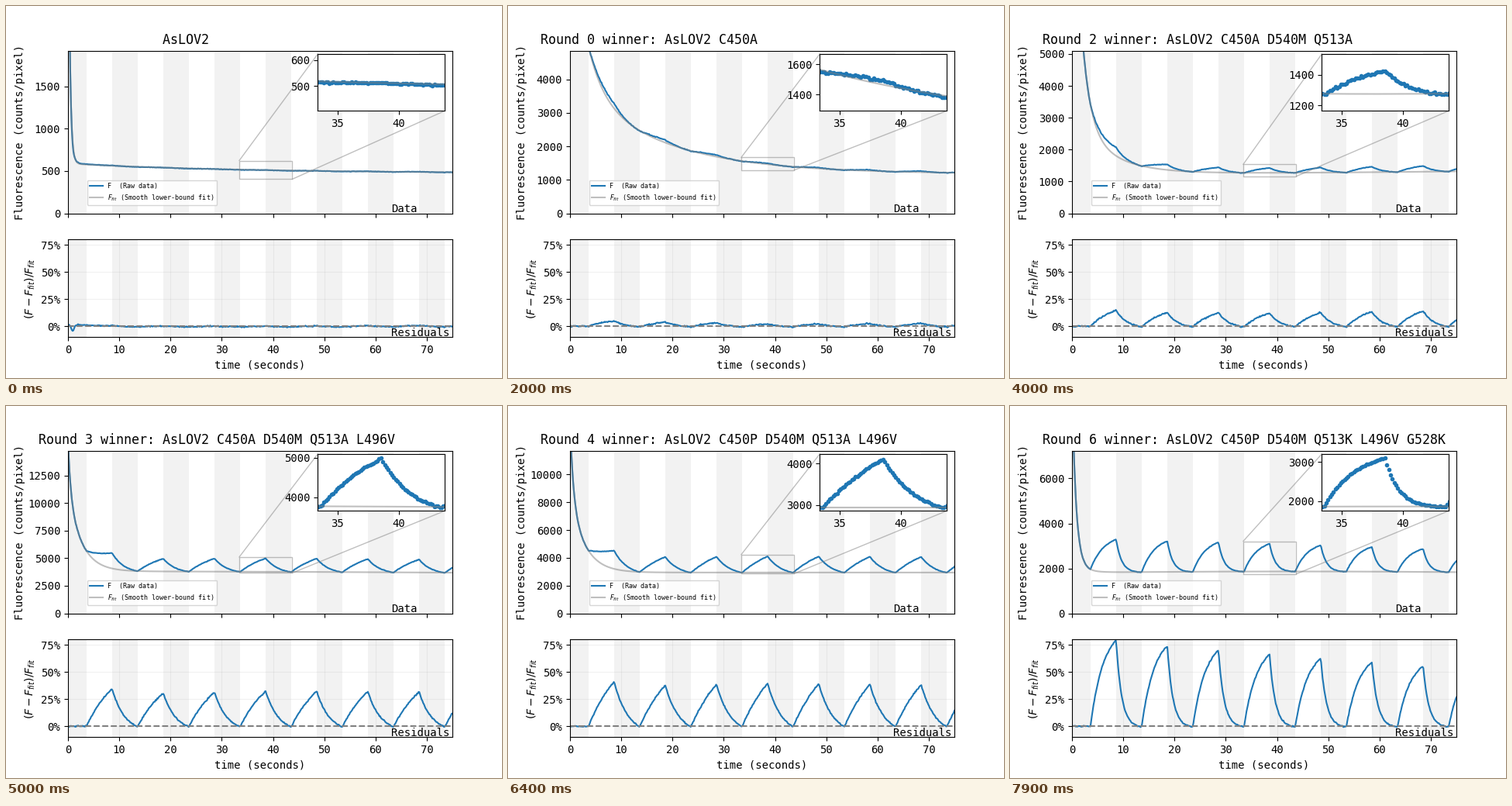
Recreate the animation shown at these times as a matplotlib script. Size 640x480 px, loop 8 s.

```python
import numpy as np
import matplotlib.pyplot as plt
from matplotlib.animation import FuncAnimation
from matplotlib.ticker import PercentFormatter

plt.rcParams.update({"font.family": "DejaVu Sans Mono", "font.size": 10})

BLUE = "tab:blue"
T = np.arange(0, 75.1, 0.15)
PERIOD, LIT, DARK_START = 9.985, 5.0, 3.6
WINDOW = (33.4, 43.75)
STARTS = np.array([0, 2000, 3000, 4000, 5000, 6000, 7000, 7900])
STEP, LOOP = 100, 8000

# base: quadratic baseline, decay: (amplitude, time constant) pairs,
# peaks: residual peak in % at cycles 0, 1, 3 and 7, tau: rise and fall
ROUNDS = [
    dict(name="AsLOV2", base=(472, 0, 0), decay=((4240, 0.33), (115, 36)),
         peaks=(0, 0, 0, 0.8), tau=(4, 4), top=1922, zoom=(404, 623)),
    dict(name="AsLOV2 C450A", base=(1180, 0, 0),
         decay=((5236, 3), (2742, 17)),
         peaks=(4.8, 3.8, 2, 2.8), tau=(4, 3), top=4853, zoom=(1291, 1668)),
    dict(name="AsLOV2 C450A D540M", base=(4360, 0, 0),
         decay=((5100, 2), (4516, 11.5)),
         peaks=(2.2, 1.8, 1.4, 1), tau=(4, 3), top=17422, zoom=(4345, 4735)),
    dict(name="AsLOV2 C450A D540M Q513A", base=(1251, 0, 0.012),
         decay=((10171, 1.6), (1904, 6.5)),
         peaks=(14.5, 12.5, 12, 14.5), tau=(4.2, 2.2), top=5107,
         zoom=(1163, 1537)),
    dict(name="AsLOV2 C450A D540M Q513A L496V", base=(3800, 0, -0.02),
         decay=((4500, 0.5), (7400, 2.6)),
         peaks=(34.5, 30.5, 32.3, 31.3), tau=(6, 2.5), top=14739,
         zoom=(3662, 5098)),
    dict(name="AsLOV2 C450P D540M Q513A L496V", base=(2945, 0, 0),
         decay=((5400, 0.6), (5700, 2.8)),
         peaks=(41.2, 37.8, 39.5, 37.8), tau=(7, 2.8), top=11725,
         zoom=(2864, 4233)),
    dict(name="AsLOV2 C450P D540M Q513K L496V", base=(2200, 1.5, -0.02),
         decay=((7500, 0.75), (1200, 2)),
         peaks=(60, 57, 53, 46), tau=(3.5, 1.6), top=8760,
         zoom=(2110, 3500)),
    dict(name="AsLOV2 C450P D540M Q513K L496V G528K",
         base=(1808, 2.6, -0.03), decay=((8000, 0.75), (500, 2)),
         peaks=(79, 74, 66, 52), tau=(2.5, 1.1), top=7237,
         zoom=(1752, 3208)),
]


def residual(index, spec):
    """Sawtooth of saturating rises and exponential falls, plus noise."""
    cycle = np.floor((T - DARK_START) / PERIOD)
    u = T - DARK_START - cycle * PERIOD
    peak = np.interp(cycle, [0, 1, 3, 7], spec["peaks"]) / 100
    rise, fall = spec["tau"]
    low = np.where(cycle > 0, -0.006, 0)
    up = (1 - np.exp(-u / rise)) / (1 - np.exp(-LIT / rise))
    end = np.exp(-LIT / fall)
    down = (np.exp(-(u - LIT) / fall) - end) / (1 - end)
    r = np.where(u < LIT, low + (peak - low) * up,
                 -0.006 + (peak + 0.006) * down)
    r[T < DARK_START] = 0
    if index == 0:
        r += 0.022 * np.exp(-T / 5) - 0.06 * np.exp(-((T - 0.9) / 0.45) ** 2)
    return r + np.random.default_rng(index + 5).normal(0, 0.0028, T.size)


def curves(index, spec):
    c, m, k = spec["base"]
    fit = c + m * T + k * T**2
    for amp, tau in spec["decay"]:
        fit = fit + amp * np.exp(-T / tau)
    r = residual(index, spec)
    return fit * (1 + r), fit, r


DATA = [curves(i, spec) for i, spec in enumerate(ROUNDS)]

fig, (ax, res) = plt.subplots(
    2, 1, sharex=True, figsize=(6.4, 4.8), dpi=100,
    gridspec_kw=dict(height_ratios=[5, 3], hspace=0.2))

for panel, label in ((ax, "Data"), (res, "Residuals")):
    for k in range(8):
        start = DARK_START + LIT + (k - 1) * PERIOD
        panel.axvspan(start, start + LIT, color="0.95", lw=0)
    panel.text(0.84, 0.01, label, transform=panel.transAxes)

title = fig.text(42 / 640, 1 - 49.3 / 480, "", fontsize=12)

raw, = ax.plot([], [], color=BLUE, lw=1.5, label="F  (Raw data)")
fit_line, = ax.plot([], [], color="gray", alpha=0.5, lw=1.5,
                    label="$F_{fit}$ (Smooth lower-bound fit)")
ax.set_xlim(0, 75)
ax.set_ylabel("Fluorescence (counts/pixel)")
ax.yaxis.set_label_coords(-0.11, 0.5)
ax.legend(loc=(0.05, 0.05), fontsize=6)

zoom = ax.inset_axes([0.65, 0.63, 0.33, 0.35])
zoom_raw, = zoom.plot([], [], ".", color=BLUE)
zoom_fit, = zoom.plot([], [], color="gray", alpha=0.5, lw=1.5)
zoom.set_xlim(*WINDOW)
frame_box, links = ax.indicate_inset_zoom(zoom)
for n, link in enumerate(links):
    link.set_visible(n in (1, 2))

res_line, = res.plot([], [], color=BLUE, lw=1.5)
res.axhline(0, color="gray", ls="--", lw=1.5)
res.grid(color="#b0b0b0", alpha=0.18)
res.set_ylim(-0.1, 0.8)
res.set_yticks([0, 0.25, 0.5, 0.75])
res.yaxis.set_major_formatter(PercentFormatter(1, decimals=0))
res.set_ylabel("$(F-F_{fit})/F_{fit}$")
res.set_xlabel("time (seconds)")


def update(frame):
    i = int(np.searchsorted(STARTS, frame * STEP, side="right")) - 1
    spec = ROUNDS[i]
    data, fit, r = DATA[i]
    prefix = f"Round {i - 1} winner: " if i else " " * 16
    title.set_text(prefix + spec["name"])
    for line, y in ((raw, data), (zoom_raw, data), (fit_line, fit),
                    (zoom_fit, fit), (res_line, r)):
        line.set_data(T, y)
    ax.set_ylim(0, spec["top"])
    low, high = spec["zoom"]
    zoom.set_ylim(low, high)
    left, right = WINDOW
    frame_box.set_bounds(left, low, right - left, high - low)
    links[1].xy2 = (left, high)
    links[2].xy2 = (right, low)
    return ()


anim = FuncAnimation(fig, update, frames=LOOP // STEP, interval=STEP,
                     repeat=True, repeat_delay=0)
plt.show()
```
